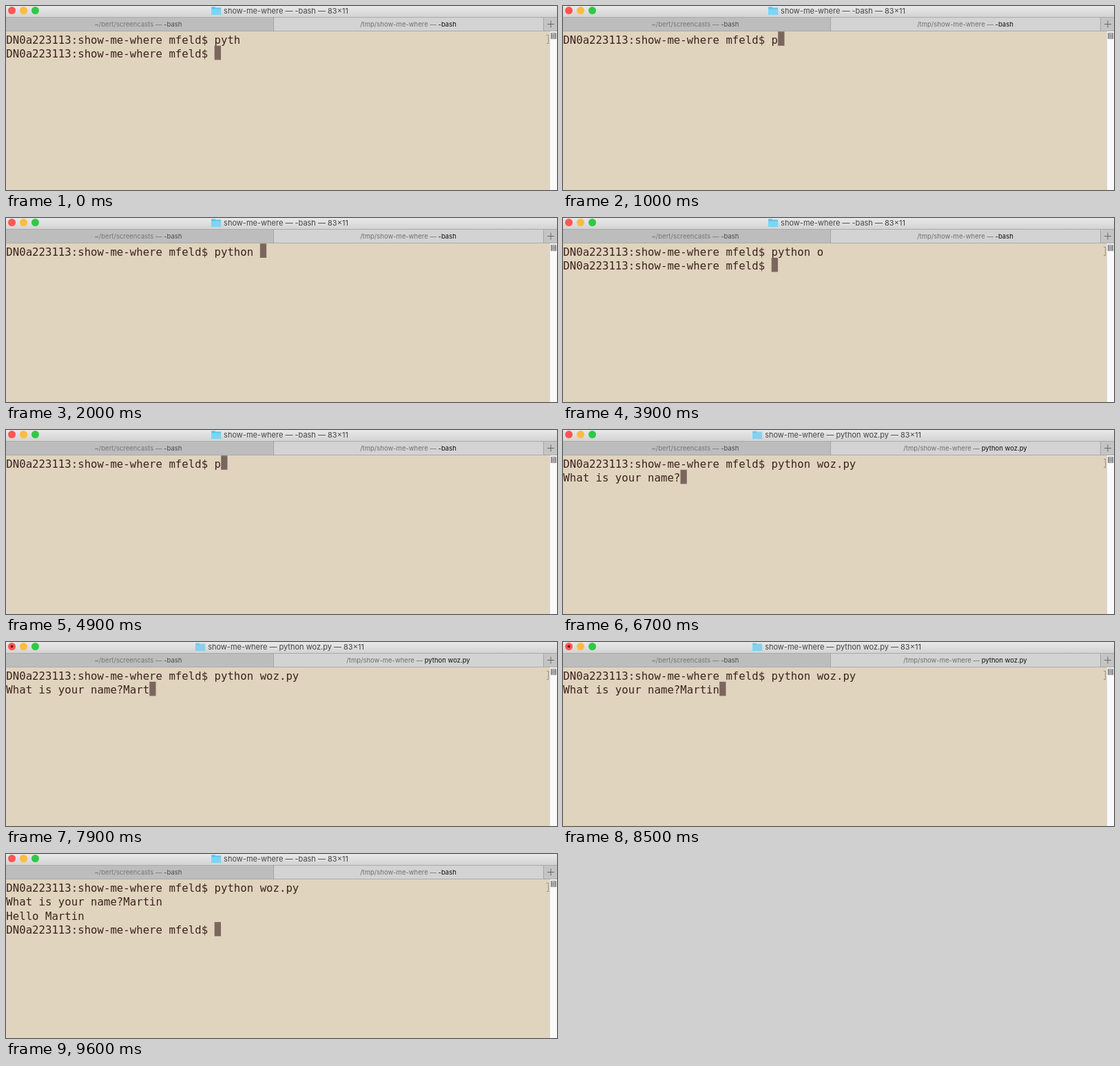
Recreate the animation shown at these times as an HTML page with a canvas. Size 800 by 268 pixels, loop 9.7 s.

```html
<!DOCTYPE html>
<html lang="en">
<head>
<meta charset="utf-8">
<title>Terminal</title>
<style>
html, body { margin: 0; width: 100%; height: 100%; overflow: hidden; }
canvas { display: block; }
</style>
</head>
<body>
<canvas id="stage" width="800" height="268"></canvas>
<script>
const ctx = document.getElementById('stage').getContext('2d');
const LOOP = 9700, LINE = 20.6, TOP = 37.3;
const PROMPT = 'DN0a223113:show-me-where mfeld$ ';
const MONO = '15.7px "DejaVu Sans Mono", monospace';
const UI = 'Inter, sans-serif';

function rect(color, x, y, w, h) {
  ctx.fillStyle = color;
  ctx.fillRect(x, y, w, h);
}

function dot(color, x, y, r) {
  ctx.fillStyle = color;
  ctx.beginPath();
  ctx.arc(x, y, r, 0, 7);
  ctx.fill();
}

function text(s, x, y, color) {
  ctx.fillStyle = color;
  ctx.fillText(s, x, y);
}

const typed = (s, t, start, gap) =>
  s.slice(0, Math.max(0, Math.floor((t - start) / gap) + 1));

// Terminal content at time t
function screen(t) {
  if (t < 500) return [PROMPT + 'pyth', PROMPT];
  if (t < 3500) return [PROMPT + typed('python ', t, 900, 150) + typed('o', t, 2500, 100)];
  if (t < 4500) return [PROMPT + 'python o', PROMPT];
  if (t < 6500) return [PROMPT + typed('python ', t, 4800, 110) + typed('woz.py', t, 5700, 110)];
  const lines = [PROMPT + 'python woz.py', 'What is your name?' + typed('Martin', t, 7480, 130)];
  return t < 8700 ? lines : [...lines, 'Hello Martin', PROMPT];
}

function tabLabel(path, job, center, pathColor, jobColor) {
  const head = path + ' — ';
  const w = ctx.measureText(head).width;
  const x = center - (w + ctx.measureText(job).width) / 2;
  text(head, x, 30, pathColor);
  text(job, x + w, 30, jobColor);
}

function folder(x) {
  rect('#55b9e2', x, 1.5, 6, 3);
  rect('#62c4ea', x, 2.5, 14, 10.5);
  rect('#7dd5f5', x, 4.5, 14, 8.5);
}

function chrome(t) {
  const running = t >= 6550 && t < 8800;
  const job = running ? 'python woz.py' : '-bash';

  const bar = ctx.createLinearGradient(0, 0, 0, 16);
  bar.addColorStop(0, '#e9e9e9');
  bar.addColorStop(1, '#d3d3d3');
  rect(bar, 0, 0, 800, 16);
  ['#fc5753', '#fdbc40', '#33c748'].forEach((c, i) => dot(c, 8.5 + i * 17, 6.5, 5.5));
  if (running && t >= 7100) dot('#7a0f0b', 8.5, 6.5, 2);

  ctx.font = '11px ' + UI;
  const title = `show-me-where — ${job} — 83×11`;
  const x = 397.5 - (ctx.measureText(title).width + 18) / 2;
  ctx.globalAlpha = running ? 0.6 : 1;
  folder(x);
  ctx.globalAlpha = 1;
  text(title, x + 18, 11, '#444');

  rect('#bdbdbd', 0, 16, 388, 21);
  rect('#d3d3d3', 388, 16, 392, 21);
  rect('#c4c4c4', 780, 16, 20, 21);
  rect('#a9a9a9', 0, 16, 800, 1);
  rect('#a9a9a9', 0, 36, 800, 1);
  rect('#a5a5a5', 388, 16, 1, 21);
  rect('#a5a5a5', 780, 16, 1, 21);
  rect('#666', 786, 26, 10, 1);
  rect('#666', 790.5, 21.5, 1, 10);

  ctx.font = '9.5px ' + UI;
  tabLabel('~/bert/screencasts', '-bash', 192, '#777', '#4c4c4c');
  tabLabel('/tmp/show-me-where', job, 584, '#707070', '#111');
}

function scrollbar() {
  rect('#fafafa', 789, 37, 11, 231);
  rect('#d5d5d5', 789, 37, 1, 231);
  rect('#777', 791, 39, 8, 9);
  rect('#f4f4f4', 792, 40, 6, 7);
  for (let y = 41; y < 47; y += 2) rect('#555', 792, y, 6, 1);
}

function terminal(t) {
  rect('#e0d4be', 0, 37, 800, 231);
  const lines = screen(t);
  ctx.font = MONO;
  lines.forEach((s, i) => text(s, 0.3, TOP + i * LINE + 17.3, '#3d211d'));
  const last = lines.length - 1;
  rect('#7b665e', 0.5 + ctx.measureText(lines[last]).width, TOP + last * LINE, 9.3, LINE);

  // Closing bracket beside an entered command
  if (last > 0) {
    rect('#9b9180', 787, 42, 1, 13);
    rect('#9b9180', 785, 42, 2, 1);
    rect('#9b9180', 785, 54, 2, 1);
  }
  scrollbar();
}

function draw() {
  const t = performance.now() % LOOP;
  terminal(t);
  chrome(t);
  requestAnimationFrame(draw);
}
draw();
</script>
</body>
</html>
```
